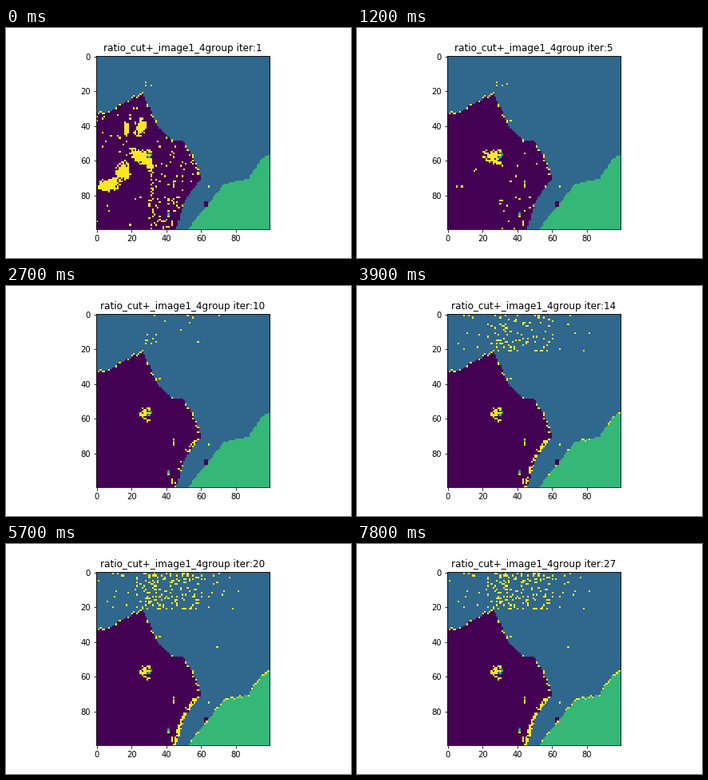
Write a matplotlib script that moves like this. It is 432 px wide and 288 px high and loops after 8100 ms.

```python
import matplotlib.pyplot as plt
import numpy as np
from matplotlib.animation import FuncAnimation

N, STEPS, FOREVER = 100, 27, 99
PURPLE, BLUE, GREEN, YELLOW = range(4)

plt.rcParams.update({"font.family": "DejaVu Sans", "font.size": 10,
                     "axes.titlesize": 12, "text.kerning_factor": 6})
rng = np.random.default_rng(12)
rows, cols = np.mgrid[:N, :N]


def outline(*points):
    """Whole-cell line through a few (position, value) points."""
    x, y = zip(*points)
    return np.rint(np.interp(np.arange(N), x, y)).astype(int)


# Outlines of the regions: top and right edge of purple, top of green.
top = outline((0, 33), (6, 33), (16, 27), (26, 22))
right = outline((22, 27), (33, 32), (40, 35), (48, 43), (49, 50), (57, 55),
                (66, 59), (71, 60), (81, 52), (86, 50), (99, 46))
green_top = outline((52, 100), (60, 90), (73, 74), (87, 71), (94, 60), (99, 57))

land = (rows >= top[cols]) & (cols < right[rows]) & (rows >= 22)
field = (cols >= 52) & (rows >= green_top[cols])
base = np.select([land, field], [PURPLE, GREEN], BLUE)
base[84:87, 62:64] = PURPLE

# A cell is yellow from its birth to its death.
birth = np.full((N, N), FOREVER)
death = np.full((N, N), FOREVER)


def mark(c, r, start=1, end=FOREVER):
    birth[r, c], death[r, c] = start, end


def scatter(c0, c1, r0, r1, density, last):
    """Loose specks on the purple land that fade early."""
    for r in range(r0, r1):
        for c in range(c0, c1):
            if land[r, c] and rng.random() < density:
                mark(c, r, 1, 1 + int(last * rng.random()))


def blob(c0, r0, rx, ry, tilt):
    """Cells in a ragged ellipse, as (col, row, distance from the middle)."""
    dx, dy = cols - c0, rows - r0
    u = dx * np.cos(tilt) + dy * np.sin(tilt)
    v = dy * np.cos(tilt) - dx * np.sin(tilt)
    dist = np.hypot(u / rx, v / ry)
    keep = land & (rng.random((N, N)) < 1.35 * (1 - dist ** 2))
    return [(c, r, dist[r, c]) for r, c in np.argwhere(keep)]


def clump(c0, r0, rx, ry, tilt, last):
    """A clump that thins out towards its middle."""
    for c, r, d in blob(c0, r0, rx, ry, tilt):
        mark(c, r, 1, 1 + int(last * (1 - 0.5 * d) * rng.random() ** 0.7))


scatter(0, 30, 30, 58, 0.02, 4)
scatter(12, 32, 30, 54, 0.025, 4)
scatter(0, 30, 58, 100, 0.008, 4)
scatter(30, 59, 46, 100, 0.05, 5)
scatter(30, 33, 64, 100, 0.22, 5)
scatter(38, 45, 82, 100, 0.12, 6)
clump(17, 42, 2.2, 5, 0, 2)
clump(25, 41, 3.5, 6, 0.3, 2.5)
clump(15, 66, 5, 6.5, 0.2, 5)
clump(7, 74, 8, 4.5, -0.2, 5)
clump(25, 58, 9, 4, 0.6, 9)
clump(30, 62, 2, 6, -0.2, 6)

# The core of the middle clump stays, with a few other-group cells in it.
for c, r, d in blob(28, 57, 3.6, 5.5, -0.3):
    if rng.random() < 0.6:
        mark(c, r)
for c0, r0, size in ((30, 56, 3), (44, 74, 2.5), (41, 91, 2), (43, 96, 2)):
    for c, r, d in blob(c0, r0, size / 2, size, 0):
        base[r, c] = rng.choice([BLUE, BLUE, BLUE, GREEN])
        birth[r, c] = rng.choice([1, FOREVER])

# Specks along the coast.
for c in range(27):
    if rng.random() < 0.5:
        mark(c, top[c] - rng.integers(0, 3) // 2)
for r in range(22, 72):
    if rng.random() < 0.35:
        mark(right[r] - rng.integers(0, 2), r)

# The band that grows down the lower right coast.
for r in range(72, N):
    first, late = (5, 13) if r < 80 else (9, 19)
    for k in range(1, 4 if r < 79 else 3):
        if rng.random() < 0.85:
            mark(right[r] - k, r, rng.integers(first, late))

# The edge of the green region.
for c in range(53, N):
    if rng.random() < 0.6:
        mark(c, green_top[c] - rng.integers(0, 2), rng.integers(11, 19))

# Specks in the sky, densest at the top.
for _ in range(190):
    c = int(rng.normal(40, 17))
    r = int(22 * rng.random() ** 1.2)
    if 0 < c < 92 and not land[r, c]:
        mark(c, r, int(np.clip(rng.normal(14.2, 2.4), 9, 20)))
for c, r, start in ((28, 15, 1), (28, 17, 1), (31, 17, 1), (34, 16, 3),
                    (29, 12, 6), (36, 37, 5), (64, 75, 1), (69, 43, 17)):
    mark(c, r, start)

fig = plt.figure(figsize=(6, 4), dpi=72, facecolor="white")
fig.subplots_adjust(left=0.125, right=0.9, bottom=0.125, top=0.88)
ax = fig.add_subplot()
image = ax.imshow(base, cmap="viridis", vmin=0, vmax=3, interpolation="nearest")
ax.set_xticks(range(0, N, 20))
ax.set_yticks(range(0, N, 20))
title = ax.set_title("")


def update(i):
    step = i + 1
    image.set_data(np.where((birth <= step) & (step <= death), YELLOW, base))
    title.set_text(f"ratio_cut+_image1_4group iter:{step}")
    return image, title


anim = FuncAnimation(fig, update, frames=STEPS, interval=300, repeat=True,
                     repeat_delay=0, blit=False)
plt.show()
```
